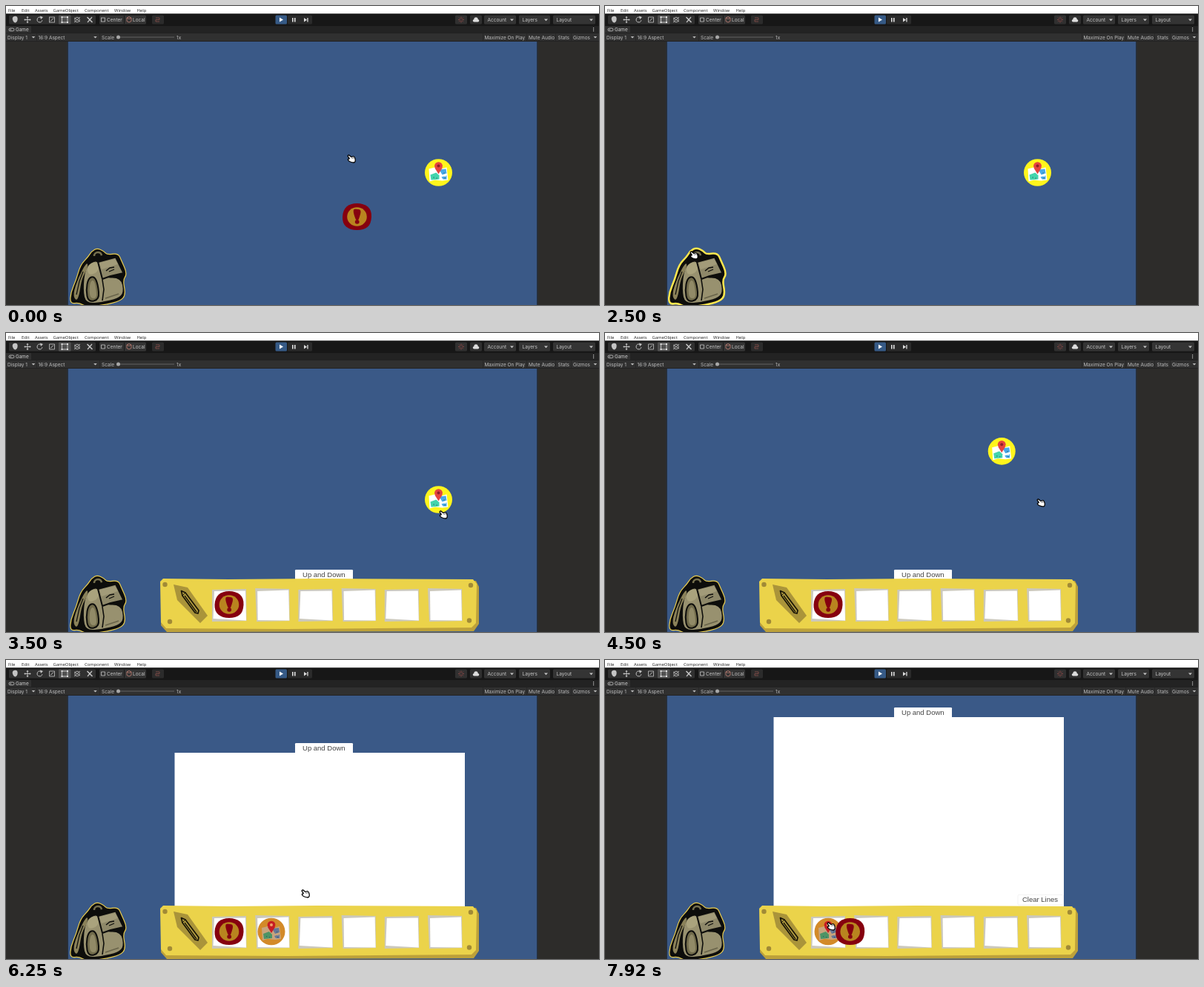
An HTML page with a canvas for the animation above (8000 ms loop, 800 by 403 pixels).

```html
<!DOCTYPE html>
<html lang="en">
<head>
<meta charset="utf-8">
<title>Inventory demo</title>
<style>
html, body { margin: 0; width: 100%; height: 100%; overflow: hidden; background: #2d2c2b; }
canvas { display: block; }
</style>
</head>
<body>
<canvas id="stage" width="800" height="403"></canvas>
<script>
const ctx = document.getElementById('stage').getContext('2d');
const LOOP = 8000;
const UI = 'Inter, sans-serif';
const MENU = '"Open Sans", sans-serif';
const LABEL = '"Liberation Sans", Arial, sans-serif';

const clamp = v => Math.max(0, Math.min(1, v));
const span = (t, start, length) => clamp((t - start) / length);
const easeOut = p => 1 - (1 - p) * (1 - p);
const smooth = p => p * p * (3 - 2 * p);
const mix = (a, b, p) => a + (b - a) * p;

function rect(x, y, w, h, fill) {
  ctx.fillStyle = fill;
  ctx.fillRect(x, y, w, h);
}

function rounded(x, y, w, h, r, fill, stroke) {
  ctx.beginPath();
  ctx.roundRect(x, y, w, h, r);
  paint(fill, stroke, 0.7);
}

function paint(fill, stroke, width = 1) {
  if (fill) { ctx.fillStyle = fill; ctx.fill(); }
  if (stroke) { ctx.strokeStyle = stroke; ctx.lineWidth = width; ctx.stroke(); }
}

function poly(p, fill, stroke, width) {
  ctx.beginPath();
  for (let i = 0; i < p.length; i += 2) ctx.lineTo(p[i], p[i + 1]);
  ctx.closePath();
  paint(fill, stroke, width);
}

// Closed curve using the points as controls.
function blob(p, fill, stroke, width) {
  const n = p.length;
  ctx.beginPath();
  ctx.moveTo((p[n - 2] + p[0]) / 2, (p[n - 1] + p[1]) / 2);
  for (let i = 0; i < n; i += 2) {
    const j = (i + 2) % n;
    ctx.quadraticCurveTo(p[i], p[i + 1], (p[i] + p[j]) / 2, (p[i + 1] + p[j + 1]) / 2);
  }
  ctx.closePath();
  paint(fill, stroke, width);
}

function line(p, stroke, width = 1) {
  ctx.beginPath();
  for (let i = 0; i < p.length; i += 2) ctx.lineTo(p[i], p[i + 1]);
  paint(null, stroke, width);
}

function oval(x, y, rx, ry, fill, stroke, width) {
  ctx.beginPath();
  ctx.ellipse(x, y, rx, ry, 0, 0, Math.PI * 2);
  paint(fill, stroke, width);
}

function text(s, x, y, size, family, fill, align = 'left') {
  ctx.font = `${size}px ${family}`;
  ctx.textAlign = align;
  ctx.textBaseline = 'alphabetic';
  ctx.fillStyle = fill;
  ctx.fillText(s, x, y);
}

function at(x, y, draw, scale = 1) {
  ctx.save();
  ctx.translate(x, y);
  ctx.scale(scale, scale);
  draw();
  ctx.restore();
}

function drawToolIcons() {
  const ink = '#c4c4c4';
  rounded(71, 12.5, 16.5, 12, 1, '#515151');
  blob([8, 17, 10, 14, 14, 13.5, 16, 16, 15, 22, 11, 23], ink);
  line([25, 18.5, 33, 18.5], ink);
  line([29, 14.5, 29, 22.5], ink);
  for (const [dx, dy] of [[1, 0], [-1, 0], [0, 1], [0, -1]]) {
    const x = 29 + dx * 4.8, y = 18.5 + dy * 4.8;
    poly([x, y, x - 2 * dx + dy * 1.5, y - 2 * dy + dx * 1.5,
      x - 2 * dx - dy * 1.5, y - 2 * dy - dx * 1.5], ink);
  }
  ctx.beginPath();
  ctx.arc(45.5, 18.5, 3.4, 0.2, 5.2);
  paint(null, ink);
  poly([46, 13.5, 50, 15, 47, 18], ink);
  ctx.strokeStyle = ink;
  ctx.lineWidth = 0.8;
  ctx.strokeRect(58.5, 15, 7, 7);
  line([60, 20.5, 64, 16.5], ink);
  ctx.strokeRect(75.5, 15, 7.5, 7);
  for (const x of [75.5, 83]) for (const y of [15, 22]) rect(x - 1, y - 1, 2, 2, '#e0e0e0');
  oval(96, 18.5, 3.3, 3.3, null, ink, 0.8);
  line([92, 22, 100, 15], ink, 0.8);
  line([92, 16, 100, 21], ink, 0.8);
  line([109.5, 15, 116.5, 22], ink, 1.6);
  line([116, 15, 110, 22], ink, 1.2);
}

function drawChrome() {
  const ink = '#c6c6c6';
  rect(0, 0, 800, 403, '#2d2c2a');
  rect(0, 0, 800, 10.5, '#fff');
  [['File', 3], ['Edit', 21], ['Assets', 39], ['GameObject', 63.5], ['Component', 106],
    ['Window', 146], ['Help', 176.5]].forEach(([s, x]) => text(s, x, 7.6, 5.9, MENU, '#222'));

  rect(0, 10.5, 800, 16.5, '#171717');
  rounded(4, 12.5, 117, 12, 1.5, '#303030');
  drawToolIcons();
  rounded(126, 12.5, 63, 12, 1.5, '#343434');
  line([159.5, 13, 159.5, 24], '#191919');
  ctx.strokeStyle = ink;
  ctx.lineWidth = 0.8;
  ctx.strokeRect(128.5, 16, 5, 5);
  text('Center', 136, 21, 6.5, UI, ink);
  poly([163, 16, 166, 14.5, 169, 16, 169, 20.5, 166, 22, 163, 20.5], null, '#c78378', 0.8);
  line([163, 16, 166, 17.5, 169, 16], '#c78378', 0.7);
  text('Local', 171, 21, 6.5, UI, ink);
  rounded(197, 12.5, 16, 12, 1.5, '#2b2b2b');
  line([202, 16, 207, 16, 207, 18.5, 202, 18.5, 202, 21, 207, 21], '#8f514c', 0.8);

  rounded(363.5, 12.5, 15.5, 12, 1.5, '#365a86');
  rounded(380, 12.5, 33, 12, 1.5, '#2a2a2a');
  poly([369, 15.5, 374, 18.5, 369, 21.5], '#fff');
  rect(386, 16, 1.6, 5.5, '#ddd');
  rect(389, 16, 1.6, 5.5, '#ddd');
  poly([402, 16, 406, 18.7, 402, 21.5], '#ddd');
  rect(406.3, 16, 1.3, 5.5, '#ddd');

  rounded(606, 12.5, 16, 12, 1.5, '#303030');
  rounded(626, 12.5, 16, 12, 1.5, '#303030');
  for (let a = 0; a < 8; a++) {
    const c = Math.cos(a * Math.PI / 4), s = Math.sin(a * Math.PI / 4);
    line([614 + c * 1.5, 18.5 + s * 1.5, 614 + c * 4, 18.5 + s * 4], '#8c4846', 0.9);
  }
  oval(634, 18, 2.7, 2.7, '#ddd');
  rounded(629.8, 18, 8.5, 3.5, 1.7, '#ddd');
  [['Account', 645, 43], ['Layers', 692, 42], ['Layout', 738, 57]].forEach(([s, x, w]) => {
    rounded(x, 12.5, w, 12, 1.5, '#343434');
    text(s, x + 4.5, 21, 6.5, UI, ink);
    poly([x + w - 8, 17.5, x + w - 3, 17.5, x + w - 5.5, 20.2], ink);
  });

  rect(0, 27, 800, 9.5, '#232323');
  rect(0, 27, 34, 9.5, '#303030');
  rounded(4, 30, 7, 3.7, 1.8, null, '#ddd');
  rect(5.5, 31.4, 1.4, 1, '#ddd');
  text('Game', 13, 34.2, 6.4, UI, '#d0d0d0');
  for (const y of [29, 31, 33]) rect(792, y, 1.2, 1.2, '#bbb');

  rect(0, 36.5, 800, 10.5, '#303030');
  rect(0, 36.2, 800, 0.6, '#1d1d1d');
  rect(0, 47, 800, 1, '#222');
  [['Display 1', 2], ['16:9 Aspect', 43.5], ['Scale', 129], ['1x', 230], ['Maximize On Play', 645.5],
    ['Mute Audio', 705], ['Stats', 744.5], ['Gizmos', 765]]
    .forEach(([s, x]) => text(s, x, 44.5, 6.5, UI, '#bfbfbf'));
  for (const x of [37, 120.5, 795]) poly([x - 2.3, 41, x + 2.3, 41, x, 43.5], '#bbb');
  line([151, 42, 227, 42], '#707070', 0.8);
  oval(151.5, 42, 2.5, 2.5, '#a8a8a8');
  for (const x of [41, 126, 643, 702, 741, 762]) rect(x, 37, 0.7, 10, '#252525');

  rect(82.5, 48, 635, 355, '#27313f');
  rect(84, 48, 632, 355, '#3a5987');
}

function drawBackpack(hover) {
  const ink = '#0d0d0b';
  const outline = [87, 401, 88, 386, 95, 370, 101, 349, 111, 339, 116, 331, 123, 327, 132, 331, 136, 336,
    151, 334, 155, 343, 163, 361, 157, 369, 161, 389, 154, 397, 134, 402, 109, 405, 98, 399];
  ctx.lineJoin = 'round';
  blob(outline, '#f0d957', hover ? '#ffe74d' : '#e8cc50', hover ? 5 : 2.4);
  blob(outline, ink);
  blob([109, 345, 98, 365, 90, 389, 95, 398, 99, 389, 102, 368, 111, 351], '#8b8259');
  line([104, 358, 99, 371, 95, 389], ink, 1.2);
  blob([107, 352, 122, 342, 128, 352, 130, 367, 155, 366, 159, 386, 151, 394, 130, 399, 108, 401, 104, 383],
    '#98916f');
  blob([111, 367, 119, 364, 124, 375, 126, 396, 111, 399, 108, 383], '#716b4b', ink, 2);
  blob([114, 371, 119, 369, 122, 384, 122, 394, 114, 394, 112, 383], '#918a67');
  blob([109, 350, 121, 344, 127, 351, 122, 360, 111, 363], '#aaa37d');
  poly([124, 345, 148, 338.5, 158.5, 360, 141, 364, 130, 368], '#8e8869', ink, 2);
  poly([126, 346, 147, 341, 151, 348, 129, 355], '#a29b79');
  line([135, 357, 140, 353, 146, 352], ink, 1.6);
  line([139, 358, 146, 355], ink, 1.2);
  line([130, 369, 132, 382, 130, 397], ink, 1.6);
  line([134, 394, 152, 388], '#68634a', 1.4);
  ctx.beginPath();
  ctx.arc(124, 337, 5, Math.PI, Math.PI * 1.95);
  paint(null, '#76704e', 2.5);
}

function drawAlert() {
  const red = '#86000f';
  blob([-19, -9, -9, -18, 9, -18, 20, -9, 19, 10, 9, 18, -9, 18, -20, 9], red);
  oval(0, 0, 13.3, 12.8, '#b9841f');
  blob([-6, -10, 0, -10.5, 6, -9, 3, 2, 1, 6, -2, 4], red);
  oval(0.2, 7, 2.9, 2.7, red);
}

const BRIGHT = { disc: '#fff51c', paper: '#fff', sea: '#47a9e9', land: '#43d4ad', pin: '#e4443f', dot: '#8e2029' };
const MUTED = { disc: '#d38a29', paper: '#c8a47d', sea: '#667797', land: '#4d9465', pin: '#c71d24', dot: '#f0a36c' };

function drawMap(c) {
  oval(0, 0, 18.5, 18.3, c.disc);
  poly([-13, -5, -5, -7, 4, -5, 11, -7, 13, 10, 5, 11, -5, 10, -12, 12], c.paper);
  poly([1, -4, 10, -5, 11, 1, 5, 3], c.sea);
  poly([-11, 3, -3, 0, 1, 4, 1, 9, -10, 10], c.land);
  poly([4, 6, 11, 4, 11, 9, 6, 9], c.sea);
  line([-6, -3, 2, 3, 10, 5], c.paper, 1.2);
  for (const [x, y] of [[-7, 6], [-3, 7], [7, 0], [8, 7]]) rect(x, y, 1.2, 1.2, '#285e69');
  poly([-5, -6, 5, -6, 0, 2], c.pin);
  oval(0, -9, 5.4, 5.3, c.pin);
  oval(0, -9, 2, 2, c.dot);
}

function drawPencilTag() {
  poly([226, 339, 245, 343, 272, 381, 262, 391, 231, 360], '#aa943a');
  poly([236.5, 347.5, 242, 350, 260, 374, 259, 378, 255, 377, 238, 354], '#b19b3f', '#171407', 1.7);
  line([241, 354, 257, 376], '#171407', 1.3);
  line([238, 354, 242, 350], '#171407', 1);
}

function drawPanel(offset) {
  at(0, offset, () => {
    poly([211, 335, 634, 334, 638, 342, 638, 392, 631, 402, 217, 403, 209, 394], '#bda13a');
    poly([208, 335, 212, 331, 300, 332, 420, 331, 630, 332, 635, 338, 634, 391, 628, 397,
      500, 398, 380, 399, 216, 398, 209, 390], '#ebd34a');
    for (const [x, y] of [[214.5, 339], [221, 389], [627, 340], [625, 387.5]]) {
      oval(x, y, 3.2, 3.2, '#a18a36');
    }
    drawPencilTag();
    for (let i = 0; i < 6; i++) {
      const x = 278 + i * 58.2, tilt = i % 2 ? 1 : -1;
      poly([x, 345 - tilt, x + 46, 345, x + 46.5, 388, x + 1 + tilt, 389], '#cbc8bd');
      poly([x + 3, 348, x + 45, 347 - tilt * 0.5, x + 46, 387.5, x + 2.5 + tilt, 386 + tilt], '#fff');
    }
  });
}

function drawSheet(top, showButton) {
  rect(227.5, top + 13, 391.5, Math.max(0, 334 - top - 13), '#fff');
  rounded(390, top, 78, 14, 1.2, '#fff');
  text('Up and Down', 428.8, top + 9.8, 9.5, LABEL, '#444', 'center');
  if (showButton) {
    rounded(557, 316.5, 61, 13.5, 1, '#fff', '#eeeeee');
    text('Clear Lines', 587, 326.3, 9.5, LABEL, '#444', 'center');
  }
}

function drawHand(pressed) {
  if (pressed) {
    line([0, 1, 5, 5], '#161616', 2);
    oval(5, 5, 1, 1.6, '#565656');
    blob([-5, -2, -2, -5, 2, -3, 2, 1, -2, 3], '#fff', '#161616', 1);
    return;
  }
  blob([-5.5, -4, -3.5, -5.5, 0, -2, 3, -4, 5.5, 0, 5, 5, 1, 5, -4, 3, -5, 0, -2, 0], '#fff', '#050505', 1.3);
  line([0, -1.5, 1.5, 0], '#111', 0.7);
  line([2, -2, 3, -0.5], '#111', 0.7);
}

const CURSOR = [
  [0, 466, 206], [80, 466, 206], [670, 473, 254], [830, 473, 254], [920, 478, 281], [1170, 478, 281],
  [1330, 478, 277], [1900, 478, 277], [2400, 120, 336], [3040, 120, 336], [3470, 590, 245], [3550, 590, 245],
  [3900, 586, 230], [5080, 590, 228], [5580, 412, 312], [5830, 404, 315], [6300, 404, 315],
  [6750, 363, 361], [7170, 363, 360], [7900, 305, 359], [8000, 305, 359]
];

function cursorAt(t) {
  const i = CURSOR.findIndex(k => k[0] > t);
  const [t0, x0, y0] = CURSOR[i - 1], [t1, x1, y1] = CURSOR[i];
  const p = smooth(span(t, t0, t1 - t0));
  return [mix(x0, x1, p), mix(y0, y1, p)];
}

function fly(p, x0, y0, cx, cy, x1, y1) {
  return [mix(mix(x0, cx, p), mix(cx, x1, p), p), mix(mix(y0, cy, p), mix(cy, y1, p), p)];
}

function alertAt(t, offset) {
  if (t < 2350) return fly(smooth(span(t, 1850, 500)), 473.5, 284, 400, 220, 301, 440);
  return [mix(301, 358, smooth(span(t, 7700, 430))), 366 + offset];
}

function mapAt(t, cursorX) {
  if (t < 7170) return fly(smooth(span(t, 4280, 600)), 583.5, 224.5, 520, 40, 358, 366);
  return [mix(358, 301, smooth(span(t, 7170, 730))), 366];
}

function draw(t) {
  const [x, y] = cursorAt(t);
  const offset = 118 * (1 - easeOut(span(t, 2450, 1000)));
  const rise = 255 * easeOut(span(t, 5900, 620));
  drawChrome();
  drawBackpack(t > 2380 && t < 3080);
  if (t > 2450) {
    drawSheet(319 + offset - rise, t > 6520);
    drawPanel(offset);
  }
  at(...mapAt(t), () => drawMap(t < 4850 ? BRIGHT : MUTED));
  at(...alertAt(t, offset), drawAlert);
  at(x, y, () => drawHand(t > 1330 && t < 1900));
}

function tick(now) {
  draw(now % LOOP);
  requestAnimationFrame(tick);
}
requestAnimationFrame(tick);
</script>
</body>
</html>
```
